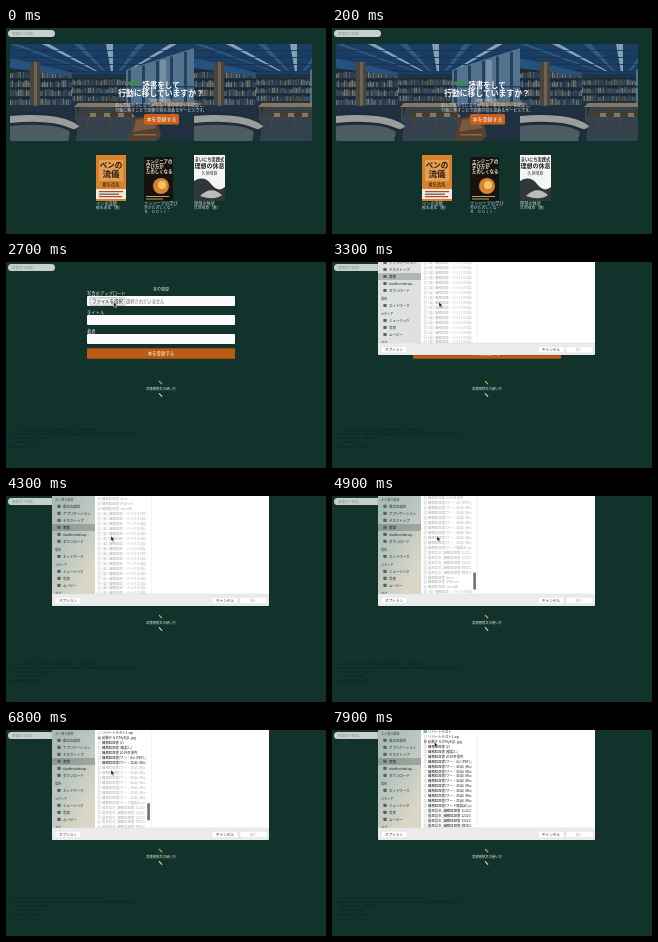
An HTML page that plays this animation: 320x206 px, repeating every 8000 ms.

```html
<!DOCTYPE html>
<html lang="ja">
<head>
<meta charset="utf-8">
<style>
html, body { margin: 0; width: 100%; height: 100%; overflow: hidden; background: #11332c; }
svg { display: block; width: 100%; height: 100%; }
text { font-family: "Noto Sans CJK JP", "Noto Sans CJK", "Noto Sans", sans-serif; white-space: pre; }
.mono { font-family: "Noto Sans Mono", "DejaVu Sans Mono", monospace; }
</style>
</head>
<body>
<svg id="stage" viewBox="0 0 320 206" preserveAspectRatio="none"></svg>
<script>
const LOOP = 8000, STEP = 100, PITCH = 4.95;
const ORANGE = '#bf5a14';

const rect = (x, y, w, h, fill, more = '') =>
  `<rect x="${x}" y="${y}" width="${w}" height="${h}" fill="${fill}" ${more}/>`;
const text = (x, y, s, size, fill, more = '') =>
  `<text x="${x}" y="${y}" font-size="${size}" fill="${fill}" ${more}>${s}</text>`;
const poly = (points, fill, more = '') => `<polygon points="${points}" fill="${fill}" ${more}/>`;
const mid = 'text-anchor="middle"';
const bold = 'font-weight="700"';

let seed = 7;
const random = () => (seed = (seed * 16807) % 2147483647) / 2147483647;

function books(x, y, w, h) {
  const colors = ['#5d6670', '#7d8078', '#41566d', '#5f5148', '#35495f', '#8b8c80'];
  let out = rect(x, y, w, h, '#1f2d3c');
  for (let bx = x; bx < x + w - 1; bx += 1.6) {
    const bh = h * (0.55 + random() * 0.3);
    out += rect(bx, y + h - bh, 1.3, bh, colors[Math.floor(random() * colors.length)]);
  }
  return out;
}

const table = (x, y, w) => poly(`${x + 4},${y} ${x + w},${y} ${x + w + 3},${y + 4} ${x},${y + 4}`, '#a58b66') +
  [1, w / 2, w].map(dx => rect(x + dx, y + 4, 1.6, 13, '#5f4c3a')).join('');

function libraryRoom() {
  let out = rect(0, 0, 184, 97, '#23384c') + poly('0,0 184,0 184,4 122,30 60,30 0,14', '#1f456f');
  for (let i = 0; i < 6; i++) {
    const x = i * 32;
    out += poly(`${x},0 ${x + 7},0 ${82 + i * 7},28 ${80 + i * 7},28`, i % 2 ? '#9dbfd6' : '#3a6893');
  }
  for (let y = 6; y < 28; y += 7) out += rect(0, y, 184, 0.8, '#183758');
  out += poly('0,14 60,30 60,62 0,66', '#22364a');
  for (let y = 26; y < 58; y += 9) out += books(0, y, 62, 8);
  for (let y = 34; y < 58; y += 8) out += books(62, y, 56, 7);
  out += poly('0,14 60,28 60,32 0,24', '#2d5e91') + rect(20, 18, 10, 52, '#594f43') + rect(24, 18, 3, 52, '#84745d');
  out += poly('116,26 184,4 184,62 116,60', '#6485a3');
  for (let i = 0; i < 5; i++) out += rect(118 + i * 14, 26 - i * 4.5, 3, 36 + i * 4.5, '#2b4a68');
  out += rect(116, 42, 68, 1.5, '#2b4a68') + rect(150, 16, 6, 40, '#a8bfcb', 'opacity=".6"');
  out += poly('0,62 184,60 184,97 0,97', '#253645') + poly('70,62 120,62 128,97 60,97', '#3d4a54');
  out += table(64, 59, 54) + table(76, 69, 46) + table(140, 58, 44);
  for (let i = 0; i < 4; i++) out += rect(72 + i * 14, 66, 8, 7, '#4d4237', 'rx="1"');
  out += poly('124,74 146,70 151,92 146,97 118,97', '#67472f') +
    poly('126,76 143,73 146,84 123,88', '#916641') + rect(124, 90, 22, 1.5, '#a27b51');
  out += '<path d="M0 68Q50 66 68 80L66 97H0Z" fill="#26313c"/>' +
    '<path d="M0 72Q52 68 69 82Q66 87 60 84Q40 75 0 79Z" fill="#b8bcb2"/>' +
    '<path d="M0 82Q46 78 60 88L58 97H0Z" fill="#5d6b73"/>';
  return out + rect(0, 0, 184, 97, '#0a1c2c', 'opacity=".18"');
}

function home() {
  let out = `<clipPath id="hero"><rect x="4" y="16" width="302" height="97" rx="2"/></clipPath>
    <g clip-path="url(#hero)"><g id="room" transform="translate(4 16)">${libraryRoom()}</g>
    <use href="#room" x="184"/></g>`;
  out += '<path d="M122 54q4-2 6 1q1-3 5-2q-1 4-5 4l-2 4l0-4q-4 1-4-3z" fill="#3d8b45"/>';
  out += text(155, 59.6, '読書をして', 7.5, '#fff', `${mid} ${bold}`) +
    text(155, 67.5, '行動に移していますか？', 7.8, '#fff', `${mid} ${bold}`) +
    text(155, 74, '「読書行動記録」', 3.6, '#ddd', mid) +
    text(155, 79, '読んで終わりになりがちな「本の学び」を記録し、', 4, '#ddd', mid) +
    text(155, 83.5, '行動に移すことで読書の質を高めるサービスです。', 4, '#ddd', mid);
  out += rect(138, 86, 35, 10.5, '#c9601c', 'rx="1.5"') +
    text(155.5, 93.2, '本を登録する', 5, '#fff', mid);

  out += rect(90, 127, 30, 46, '#d9822b') + rect(93, 132, 24, 21, '#e3a052') +
    text(105, 140, 'ペンの', 7.5, '#2a1a10', `${mid} ${bold}`) +
    text(105, 149, '流儀', 8.5, '#2a1a10', `${mid} ${bold}`) +
    text(105, 157.5, '椎名透馬', 4.2, '#2a1a10', mid) +
    rect(90, 161, 30, 10, '#f1e9dc') + rect(93, 163, 24, 1.2, '#b8442a') +
    rect(93, 165.6, 20, 1.2, '#555') + rect(93, 168, 23, 1.2, '#b8442a');
  out += rect(138, 129, 29, 44, '#15130f') +
    ['エンジニアの', '学び方が', 'たのしくなる'].map((s, i) =>
      text(140, 134.5 + i * 5.2, s, 4.4, '#f4ead0', bold)).join('') +
    '<circle cx="155" cy="158" r="8" fill="#d8842d"/><circle cx="156" cy="157" r="4" fill="#f0c766"/>' +
    rect(140, 168, 23, 1, '#b8a36a') + rect(140, 170.5, 17, 1, '#b8a36a');
  out += rect(188, 127, 31, 46, '#f5f6f4') +
    text(203.5, 132.5, 'まいにち実践式', 4.2, '#222', `${mid} ${bold}`) +
    text(203.5, 140, '理想の休息', 6, '#222', `${mid} ${bold}`) +
    text(203.5, 146.5, '久世晴臣', 4, '#333', mid) +
    '<path d="M188 153Q198 147 205 156T219 159V173H188Z" fill="#30373b"/>' +
    '<path d="M194 168Q205 157 216 167Q208 173 194 168Z" fill="#b9bdba"/>';
  const caption = (x, lines) => lines.map((s, i) =>
    text(x, 177.2 + i * 4, s, i ? 3.8 : 4.2, '#c9d2ce')).join('');
  return out + caption(90, ['ペンの流儀', '椎名透馬（著）']) +
    caption(138, ['エンジニアの学び', '方がたのしくな…', 'Ｒ．Ｄｏｌｌ…']) +
    caption(188, ['理想の休息', '久世晴臣（著）']);
}

function form() {
  const label = (y, s) => text(81, y, s, 4.3, '#e4ebe7');
  const field = y => rect(81, y, 148, 10, '#fafbfa', 'rx="1"');
  const pencil = (y, fill) =>
    `<path d="M153.3 ${y}l2.5 2.6" stroke="${fill}" stroke-width="1.1" stroke-linecap="round"/>`;
  const debug = [
    '--- !ruby/object:ActionController::Parameters',
    'parameters: !ruby/hash:ActiveSupport::HashWithIndifferentAccess',
    '  controller: books', '  action: new', 'permitted: false'];
  return text(155, 28.7, '本の登録', 4, '#e8eeeb', mid) +
    label(33, '写真のアップロード') + field(34) +
    rect(84, 35.7, 35, 7.6, '#ececec', 'rx=".7" stroke="#8b8b8b" stroke-width=".5"') +
    text(101.5, 41.2, 'ファイルを選択', 4.4, '#222', mid) +
    text(120, 41.2, '選択されていません', 4.3, '#666') +
    label(52, 'タイトル') + field(53) + label(71, '著者') + field(72) +
    rect(81, 86.3, 148, 10.5, ORANGE, 'rx="1"') +
    text(155, 93, '本を登録する', 4.4, '#fff', mid) +
    pencil(119.3, '#e3b23c') + text(155, 128.2, '読書感想文の使い方', 3.3, '#e4ebe7', mid) +
    pencil(131.7, '#e2d9b8') +
    debug.map((s, i) => text(5, 168.5 + i * 4.3, s, 3.3, '#0a241f', 'class="mono"')).join('');
}

const repeat = (n, name) => Array.from({ length: n }, (_, i) => name(i + 1));
const before = ['work_222.zip', 'work_222', 'web-current', 'works.txt', 'Zoom', 'リバートテスト',
  'バックアップテスト', 'リバートテスト2', 'スクリーンショット 1.jpg', 'スクリーンショット 2.jpg',
  'ペンの流儀 表紙(2).jpg', 'ペンの流儀 表紙(3).jpg', 'ペンの流儀 要約1.jpg', 'ペンの流儀 要約2.jpg',
  'ペンの流儀 要約3.jpg', 'リバートテスト3', 'リバートテスト4', 'リバートテスト', 'リバートテスト1.zip'];
const after = ['起動からのMySQL.jpg', '職務経歴書 (2)', '職務経歴書 (複製し)', '職務経歴書 2019卒業内',
  '職務経歴書(ワー・出) (PDF).pdf',
  ...repeat(8, i => `職務経歴書(ワー・退出) (Wordver${i})`),
  '職務経歴書(ワード複製出).pdf',
  ...repeat(3, i => `履歴見本_職務経歴書 1${i}223`),
  ...repeat(2, i => `履歴見本_職務経歴書 (修正${i})`),
  '職務経歴書.docx', '職務経歴書 (PDFver)', '職務経歴書 .docx版',
  ...repeat(18, () => '[英]  職務経歴・バイパス日誌)')];

function fileRows() {
  return [...before, ...after].map((name, i) => {
    const index = i - before.length, y = index * PITCH;
    const isFolder = index < -1 && !name.includes('.');
    const icon = isFolder
      ? rect(91.5, y - 1.5, 3.6, 3, '#70b9e2', 'rx=".5"')
      : rect(92, y - 1.6, 2.4, 3.2, name.endsWith('.jpg') ? '#a89a92' : '#eee',
        'stroke="#c4c4c4" stroke-width=".3"');
    return icon + (isFolder ? poly(`142,${y - 1} 143.5,${y} 142,${y + 1}`, '#777') : '') +
      text(96, y + 1.3, name, 3.4, '#aaa', `class="file" data-index="${index}"`);
  }).join('');
}

function sidebar() {
  const heading = (y, s) => text(49, y + 1.2, s, 3.1, '#5c6661', bold);
  const item = (y, s) => rect(51.3, y - 1.7, 3.4, 3.2, '#58645f', 'rx=".8"') +
    text(57, y + 1.3, s, 3.45, '#1b2420', 'font-weight="500"');
  const places = ['最近の項目', 'アプリケーション', 'デスクトップ', '書類', 'startbootstrap...', 'ダウンロード'];
  const media = ['ミュージック', '写真', 'ムービー'];
  return rect(46, -4, 43, 102, '#dfe1e1') + rect(46, -4, 43, 102, 'url(#side)', 'id="tint"') +
    rect(46, 28, 43, 7, '#1f2f29', 'opacity=".24"') +
    heading(4, 'よく使う項目') + places.map((s, i) => item(10.5 + i * 7, s)).join('') +
    heading(54, '場所') + item(60.5, 'ネットワーク') +
    heading(69, 'メディア') + media.map((s, i) => item(75.5 + i * 7, s)).join('') +
    heading(97.5, 'タグ');
}

function sheet() {
  const button = (x, w, s, fill = '#222') =>
    rect(x, 101.3, w, 6.4, '#fff', 'rx="1.2" stroke="#cfcfcf" stroke-width=".4"') +
    text(x + w / 2, 105.8, s, 3.6, fill, mid);
  return `<clipPath id="column"><rect x="89" y="0" width="50.5" height="98"/></clipPath>
    <clipPath id="pane"><rect x="46" y="0" width="217" height="98"/></clipPath>` +
    rect(45.5, -2, 218, 113, '#000', 'opacity=".12" rx="1.5"') +
    rect(46, -4, 217, 114, '#ececec', 'rx="1"') +
    `<g clip-path="url(#pane)">${rect(89, 0, 174, 98, '#fff')}${sidebar()}</g>` +
    rect(145, 0, 0.4, 98, '#e2e2e2') +
    `<g clip-path="url(#pane)"><g clip-path="url(#column)"><g id="list">${fileRows()}</g></g></g>` +
    rect(141.3, 0, 2.6, 17.5, '#707070', 'rx="1.3" id="thumb"') +
    rect(46, 97.8, 217, 0.4, '#d4d4d4') +
    button(49, 26, 'オプション') + button(206, 26, 'キャンセル') + button(234, 27, '開く', '#b5b5b5');
}

const stage = document.getElementById('stage');
stage.innerHTML = `<defs><linearGradient id="side" x1="0" y1=".2" x2=".6" y2="1">
    <stop stop-color="#a9bbb2"/><stop offset=".5" stop-color="#bcc7c1"/>
    <stop offset="1" stop-color="#dbd6c6"/>
  </linearGradient></defs>` + rect(0, 0, 320, 206, '#11332c') +
  rect(2, 2, 47, 7, '#c8cfcc', 'rx="3.5"') + text(6, 6.9, '書籍名で検索', 3.5, '#8b9692') +
  `<g id="home">${home()}</g><g id="form">${form()}</g><g id="sheet">${sheet()}</g>
  <path id="cursor" d="M0 0V5L1.2 4L2 5.9L2.9 5.5L2.1 3.7H3.6Z" fill="#111" stroke="#fff" stroke-width=".4"/>`;

const byId = id => document.getElementById(id);
const parts = Object.fromEntries(
  ['home', 'form', 'sheet', 'tint', 'list', 'thumb', 'cursor'].map(id => [id, byId(id)]));
const files = [...document.querySelectorAll('.file')];

const ease = p => p * p * (3 - 2 * p);
function track(keys, t) {
  const next = keys.findIndex(key => key[0] > t);
  if (next < 0) return keys[keys.length - 1][1];
  if (next === 0) return keys[0][1];
  const [t0, a] = keys[next - 1], [t1, b] = keys[next];
  return a + (b - a) * ease((t - t0) / (t1 - t0));
}

const scrollKeys = [[4400, -91], [5500, 90], [5800, 90], [6700, 8], [6900, 8], [7300, 11.5]];
const cursorX = [[1300, 121], [2200, 116], [2800, 107], [3300, 107], [3700, 105], [7300, 105], [7800, 102.5]];
const cursorY = [[1300, 43.5], [2800, 40], [7300, 40], [7800, 12]];
const tintKeys = [[3300, 0], [3800, 1]];

const show = (node, on) => node.setAttribute('display', on ? 'inline' : 'none');
const move = (node, x, y) => node.setAttribute('transform', `translate(${x} ${y})`);

function draw(t) {
  const isForm = t >= 1300;
  show(parts.home, !isForm);
  show(parts.form, isForm);
  show(parts.cursor, isForm);
  show(parts.sheet, t >= 3100);
  move(parts.cursor, track(cursorX, t), track(cursorY, t));

  const opened = Math.min(1, Math.max(0, (t - 3040) / 560));
  move(parts.sheet, 0, -110 * (1 - opened) ** 3);
  parts.tint.setAttribute('opacity', track(tintKeys, t));

  const scroll = track(scrollKeys, t);
  move(parts.list, 0, scroll);
  show(parts.thumb, t >= 4500 && t < 7400);
  parts.thumb.setAttribute('y', Math.min(80, 74.3 - scroll * 0.159));

  // Rows turn dark from the top down once they are loaded.
  const loaded = t < 6300 ? -99 : t < 6900 ? (t - 6300) / 100 : 5 + (t - 6800) / 25;
  for (const file of files) file.setAttribute('fill', +file.dataset.index <= loaded ? '#222' : '#b0b0b0');
}

const start = performance.now();
function tick() {
  const t = (performance.now() - start) % LOOP;
  draw(Math.floor(t / STEP) * STEP);
  requestAnimationFrame(tick);
}
tick();
</script>
</body>
</html>
```
